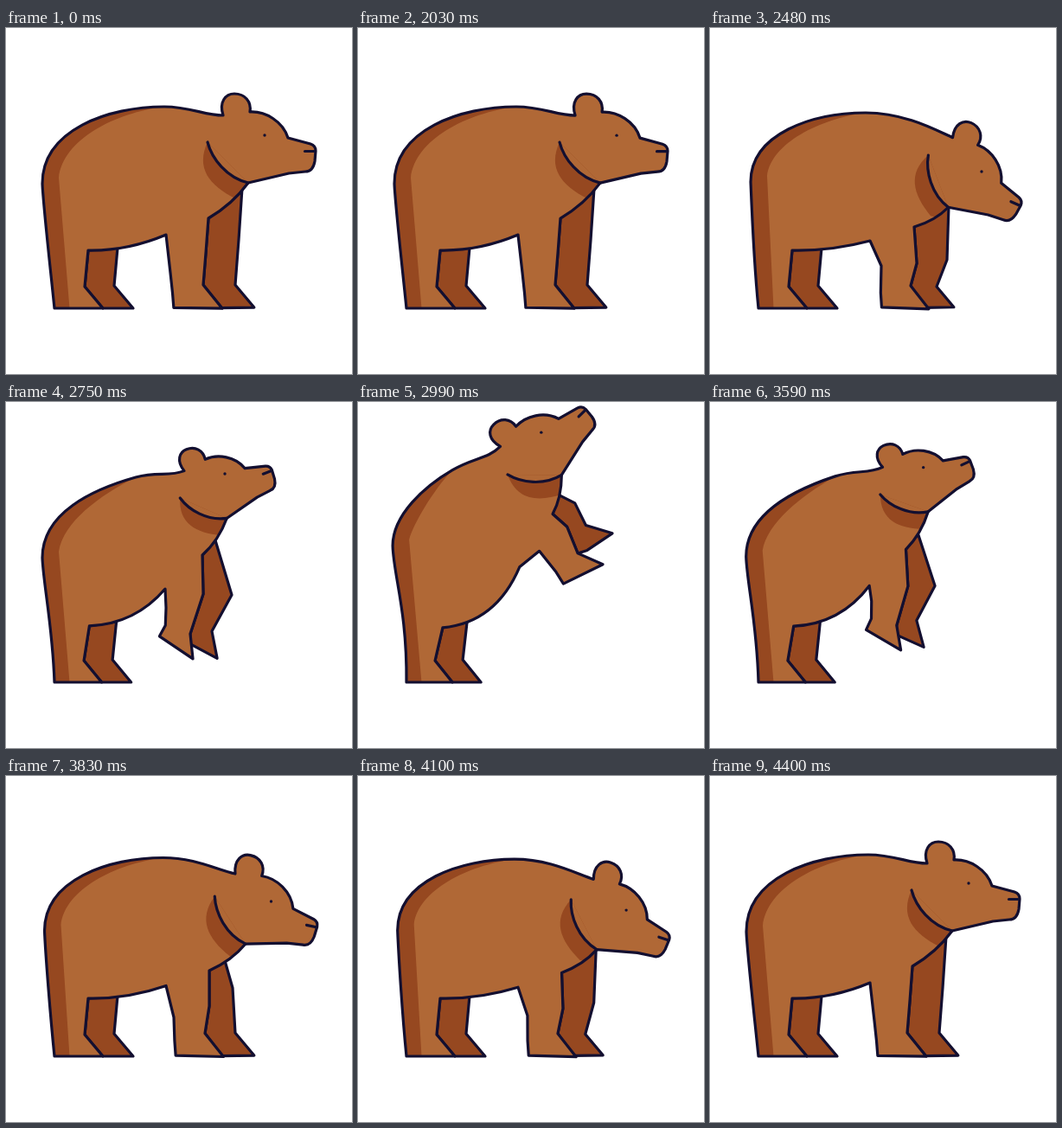
An HTML page with a canvas that plays this animation: 400x400 px, repeating every 4430 ms.

```html
<!DOCTYPE html>
<html lang="en">
<head>
<meta charset="utf-8">
<title>Bear</title>
<style>
html, body { margin: 0; width: 100%; height: 100%; overflow: hidden; background: #fff; }
canvas { display: block; }
</style>
</head>
<body>
<canvas id="stage" width="400" height="400"></canvas>
<script>
const ctx = document.getElementById('stage').getContext('2d');
const LOOP = 4430, MOVE_START = 2030, STEP = 30;
const FUR = '#b06836', SHADE = '#964820', INK = '#130f30';
const FOOT = [56, 324];

// Joints are x, y; the rigid head and paws are x, y, degrees, size.
const stand = {
  rump: [42, 180], back: [183, 91], head: [299, 124, 0, 1],
  chest: [234, 220], armpit: [185, 239],
  elbow: [231, 260], elbowBack: [190, 283], paw: [228, 297, 51, 35],
  farShoulder: [273, 185], farElbow: [269, 245], farPaw: [265, 297, 50, 34]
};
const crouch = {
  rump: [47, 178], back: [180, 98], head: [314, 166, 24, .97],
  chest: [236, 230], armpit: [185, 246],
  elbow: [239, 272], elbowBack: [198, 275], paw: [232, 298, 52, 34],
  farShoulder: [276, 205], farElbow: [274, 268], farPaw: [262, 299, 50, 31]
};
const rise = {
  rump: [42, 180], back: [150, 87], head: [253, 83, -21.5, .885],
  chest: [227, 177], armpit: [184, 216],
  elbow: [228, 222], elbowBack: [185, 238], paw: [213, 268, 84, 29],
  farShoulder: [242, 160], farElbow: [261, 223], farPaw: [238, 265, 79, 32]
};
const upright = {
  rump: [40, 165], back: [106, 78], head: [209, 32, -46, .945],
  chest: [225, 126], armpit: [187, 189],
  elbow: [243, 138], elbowBack: [212, 167], paw: [258, 167, 18, 32],
  farShoulder: [231, 103], farElbow: [250, 108], farPaw: [266, 132, 11, 32]
};

const mix = (a, b, u) => a.map((value, i) => value + (b[i] - value) * u);
const shift = ([x, y], dx, dy) => [x + dx, y + dy];
const mapPose = fn => Object.fromEntries(
  Object.keys(stand).map(part => [part, stand[part].map((_, i) => fn(part, i))]));

const land = {
  ...mapPose((part, i) => (stand[part][i] + crouch[part][i]) / 2),
  farShoulder: [252, 210], farElbow: [262, 245], farPaw: stand.farPaw
};

// flow scales the speed with which the motion passes through a key
const keys = [
  { t: 2015, pose: stand, flow: 0 },
  { t: 2480, pose: crouch, flow: 0 },
  { t: 2750, pose: rise, flow: 1 },
  { t: 3040, pose: upright, flow: .25 },
  { t: 3290, pose: upright, flow: .25 },
  { t: 3625, pose: rise, flow: 1 },
  { t: 3830, pose: land, flow: 1 },
  { t: 3950, pose: crouch, flow: 0 },
  { t: 4400, pose: stand, flow: 0 }
];

function slope(k, part, i) {
  if (!keys[k].flow) return 0;
  const a = keys[k - 1], b = keys[k + 1];
  return keys[k].flow * (b.pose[part][i] - a.pose[part][i]) / (b.t - a.t);
}

function poseAt(t) {
  if (t < MOVE_START || t >= keys[keys.length - 1].t) return stand;
  const n = keys.findIndex(key => key.t > t), k = n - 1;
  const a = keys[k], b = keys[n], span = b.t - a.t;
  const u = (t - a.t) / span, v = 1 - u;
  return mapPose((part, i) =>
    a.pose[part][i] * v * v * (1 + 2 * u) + b.pose[part][i] * u * u * (3 - 2 * u) +
    span * u * v * (slope(k, part, i) * v - slope(n, part, i) * u));
}

// Returns a function that turns local x,y pairs into stage coordinates.
function place([x, y, degrees, size]) {
  const cos = Math.cos(degrees * Math.PI / 180) * size;
  const sin = Math.sin(degrees * Math.PI / 180) * size;
  return (...local) => local.map((value, i) => i % 2
    ? y + local[i - 1] * sin + value * cos
    : x + value * cos - local[i + 1] * sin);
}

// Segments of 2, 4 or 6 numbers are lines, quadratic or cubic curves.
function trace(start, segments, closed = true) {
  const path = new Path2D();
  path.moveTo(...start);
  for (const s of segments) {
    if (s.length === 2) path.lineTo(...s);
    else if (s.length === 4) path.quadraticCurveTo(...s);
    else path.bezierCurveTo(...s);
  }
  if (closed) path.closePath();
  return path;
}

function fill(path, color) {
  ctx.fillStyle = color;
  ctx.fill(path);
}

function draw(p) {
  const onHead = place(p.head), onPaw = place(p.paw), onFarPaw = place(p.farPaw);
  const lean = Math.max(0, -p.head[2] / 46);
  const nape = onHead(-48, -23), jaw = onHead(-19, 55), cheek = onHead(-66, 8);
  const wrist = onPaw(0, 0);

  // The back follows the rump upwards and passes its top along the lean.
  const along = dx => shift(p.back, dx, -.6 * lean * dx);
  const rumpOut = shift(p.rump, 0, (p.back[1] - p.rump[1]) * (.7 - .3 * lean));
  const backIn = along((p.rump[0] - p.back[0]) * .46);
  const backOut = along((nape[0] - p.back[0]) * .45);
  const spine = [
    [51 + 6 * lean, 275 - 35 * lean, ...shift(p.rump, 1, 25 + 10 * lean), ...p.rump],
    [...rumpOut, ...backIn, ...p.back]
  ];

  const hip = [95 + 3 * lean, 257 + 4 * lean];
  const knee = [91 - 2 * lean, 299], toe = [112 - 3 * lean, 324];

  const body = trace(FOOT, [
    ...spine,
    [...backOut, ...onHead(-70, -23), ...nape],
    onHead(-53, -39, -45, -48, -35, -48),
    onHead(-23, -48, -15, -39, -17, -27),
    onHead(1, -28, 21, -16, 27, 3),
    onHead(53, 10),
    onHead(59, 12, 59, 18),
    onHead(58, 30),
    onHead(56, 42, 47, 42),
    onHead(28, 44),
    jaw,
    [...shift(mix(jaw, p.chest, .5), 5, 4), ...p.chest],
    p.elbow, wrist, onPaw(1, 0), onPaw(-.03, 1.23), onPaw(-.44, .95),
    p.elbowBack, p.armpit,
    [140 + 20 * lean, 258 - 3 * lean, ...hip],
    knee, toe
  ]);
  const farHindLeg = trace(hip, [
    [129 - 3 * lean, 254], [125 - 4 * lean, 298], [147 - 5 * lean, 324], toe, knee
  ]);
  const farFrontLeg = trace(p.farShoulder, [
    p.farElbow, onFarPaw(0, 0), onFarPaw(1, 0), onFarPaw(.31, .85),
    wrist, p.elbow, p.chest
  ]);
  const rumpShade = trace(FOOT, [
    ...spine,
    [...shift(backIn, 8, 7), ...shift(rumpOut, 24, 11), ...shift(p.rump, 19, -7)],
    [73.5, 324]
  ]);
  const neckShade = trace(cheek, [
    onHead(-80, 38, -64, 58, -34, 73), onHead(-19, 70), jaw
  ]);

  ctx.fillStyle = '#fff';
  ctx.fillRect(0, 0, 400, 400);
  ctx.strokeStyle = INK;
  ctx.lineWidth = 3.2;
  ctx.lineJoin = ctx.lineCap = 'round';

  for (const leg of [farHindLeg, farFrontLeg]) {
    fill(leg, SHADE);
    ctx.stroke(leg);
  }

  const cheekLine = trace(cheek, [onHead(-61, 27, -44, 49, -19, 55)], false);
  fill(body, FUR);
  ctx.save();
  ctx.clip(body);
  fill(rumpShade, SHADE);
  fill(neckShade, SHADE);
  fill(cheekLine, FUR);
  ctx.restore();
  ctx.stroke(body);
  ctx.stroke(cheekLine);
  ctx.stroke(trace(onHead(46.5, 18.5), [onHead(58, 18.5)], false));

  const eye = new Path2D();
  eye.arc(p.head[0], p.head[1], 1.7, 0, Math.PI * 2);
  fill(eye, INK);
}

const origin = performance.now();
function frame() {
  const t = (performance.now() - origin) % LOOP;
  draw(poseAt(MOVE_START + Math.floor((t - MOVE_START) / STEP) * STEP));
  requestAnimationFrame(frame);
}
frame();
</script>
</body>
</html>
```
